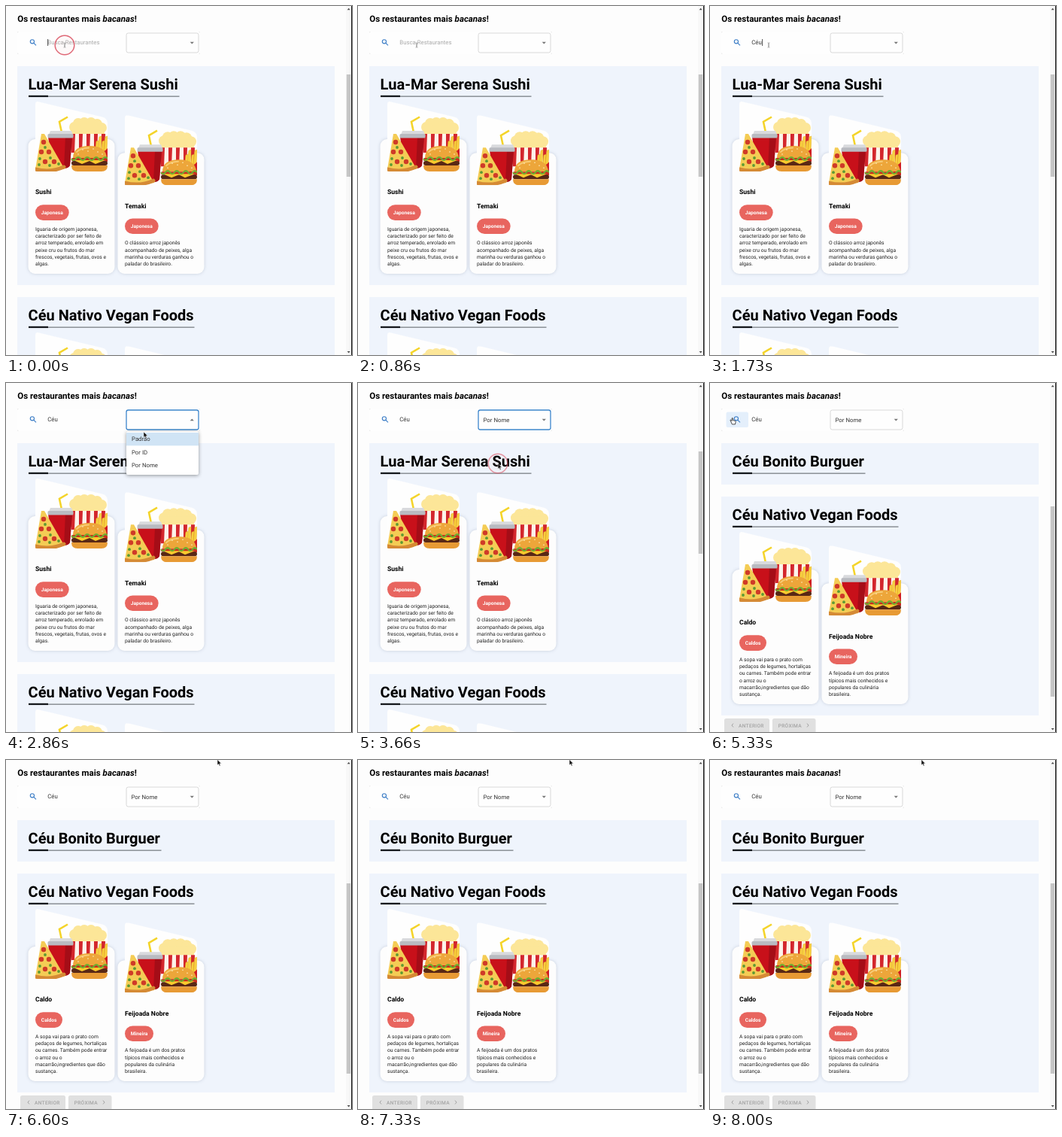
Recreate the animation shown at these times as an HTML page. Size 460 px wide and 464 px high, loop 8060 ms.

```html
<!DOCTYPE html>
<html lang="pt-BR">
<head>
<meta charset="utf-8">
<title>Restaurantes</title>
<style>
  html, body { margin: 0; width: 100%; height: 100%; overflow: hidden; background: #fdfdfd; }
  svg { display: block; }
  text { font-family: Roboto, Arial, sans-serif; text-rendering: geometricPrecision; white-space: pre; }
  .title { font-size: 11.55px; font-weight: 700; }
  .head { font-size: 20px; font-weight: 700; }
  .dish { font-size: 8.6px; font-weight: 700; }
  .tag { font-size: 6.65px; font-weight: 700; fill: #fff; }
  .body { font-size: 6.75px; fill: #222; }
  .field { font-size: 7.8px; fill: #333; }
  .btn { font-size: 6.6px; font-weight: 500; letter-spacing: .3px; fill: #a2a2a2; }
  .card { fill: #fdfdfd; filter: drop-shadow(0 .5px 2px rgba(40, 60, 90, .2)); }
  .form { fill: #fefefe; filter: drop-shadow(0 .8px .6px rgba(0, 0, 0, .3)); }
  .menu { fill: #fff; filter: drop-shadow(0 1.5px 2.5px rgba(0, 0, 0, .4)); }
</style>
</head>
<body>
<svg id="stage" width="460" height="464" viewBox="0 0 460 464"></svg>
<script>
const LOOP = 8060, STEP = 200 / 3;

const rect = (x, y, w, h, fill, more = '') =>
  `<rect x="${x}" y="${y}" width="${w}" height="${h}" fill="${fill}" ${more}/>`;
const text = (x, y, cls, str, more = '') =>
  `<text x="${x}" y="${y}" class="${cls}" ${more}>${str}</text>`;
const dots = (list, r, fill) =>
  list.map(([x, y]) => `<circle cx="${x}" cy="${y}" r="${r}" fill="${fill}"/>`).join('');
const range = n => [...Array(n).keys()];

// Meal illustration, 96 x 93, cut by a slanted top edge
const meal = `
<clipPath id="slant"><path d="M0 93V4Q0-1 5 .4L89 20.5Q96 22.5 96 29V93Z"/></clipPath>
<g id="meal" clip-path="url(#slant)">
  ${rect(0, -2, 96, 95, '#fefefe')}
  ${dots([[52, 34], [57, 29], [65, 28], [74, 28], [82, 30], [88, 35]], 7, '#fce698')}
  ${rect(47, 32, 45, 12, '#fce698')}
  <path d="M46 43H95L91 68H50Z" fill="#fdf3ea"/>
  ${range(5).map(i => `<path d="M${48 + i * 10} 43h5l-1 25h-4z" fill="#d3262c"/>`).join('')}
  ${range(4).map(i => `<path d="M${81 + i * 4} ${53 - i % 2 * 6}l3-1 -1 20h-4z" fill="#f8d040" stroke="#e3aa24" stroke-width=".5"/>`).join('')}
  <path d="M86 66Q91 68 96 62V80H86Z" fill="#cf1d22"/>
  <path d="M17 47H49L46 85Q44 89 34 89T22 85Z" fill="#c8101a"/>
  <path d="M40 47H49L46 85Q44 89 38 89Z" fill="#a50d17"/>
  <path d="M35 41L32 27L43 20.5" fill="none" stroke="#f4d42a" stroke-width="2.6"/>
  <path d="M20 39H48L50 44H18Z" fill="#d9dadd"/>
  ${rect(16.5, 43, 34, 5.5, '#b9bbc1', 'rx="1.5"')}
  <path d="M8 43L0 90H39L12 43Z" fill="#f4cc55"/>
  <path d="M0 90Q20 95 38 87" fill="none" stroke="#d58a35" stroke-width="5" stroke-linecap="round"/>
  ${dots([[11, 54], [8, 67], [18, 67], [13, 80], [25, 80]], 3.2, '#cf3a28')}
  ${dots([[13, 61], [6, 76], [20, 75], [5, 84], [31, 83], [19, 85]], 1.9, '#5c9a33')}
  <path d="M50 75Q50 59 72 59T95 75Z" fill="#eda63a"/>
  <path d="M55 67Q60 62 71 61.5" fill="none" stroke="#f8cb74" stroke-width="2" stroke-linecap="round"/>
  ${dots([[63, 64], [70, 66], [77, 63], [83, 67], [89, 70], [57, 70]], .8, '#fff0c0')}
  ${rect(48, 75, 48, 4, '#c92b20', 'rx="1.5"')}
  ${rect(48, 79, 48, 6, '#592815', 'rx="3"')}
  <path d="M51 78H93L80 83L72 79L62 83Z" fill="#f9c92d"/>
  <path d="M48 76${'q3 4 6 0t6 0'.repeat(4)}" fill="none" stroke="#6fae30" stroke-width="2.2"/>
  <path d="M48 85H96Q96 93 88 93H56Q48 93 48 85Z" fill="#e79a34"/>
</g>`;

function card(x, y, { name, tag, tagW, lines }) {
  return rect(x, y, 115, 356 - y, '#fdfdfd', 'class="card" rx="9"') +
    `<use href="#meal" x="${x + 9.5}" y="${y - 50}"/>` +
    text(x + 9.5, y + 73.3, 'dish', name) +
    rect(x + 9.5, y + 87.2, tagW, 20.7, '#e8655f', 'rx="10.3"') +
    text(x + 17.3, y + 99.9, 'tag', tag) +
    lines.map((l, i) => text(x + 9.5, y + 122.2 + i * 9.13, 'body', l)).join('');
}

// Sections are laid out as if their top were at y = 80
function section(y, h, title, lineW, cards = []) {
  return `<g transform="translate(0 ${y - 80})">` +
    rect(15, 80, 422, h, '#eff4fc') +
    text(29.6, 110.9, 'head', title) +
    rect(30, 119.7, lineW, .8, '#33383d') +
    rect(30, 118.8, 26, 2.3, '#15191d') +
    cards.map((c, i) => card(29.5 + i * 119, 177 + i * 18.2, c)).join('') + '</g>';
}

const sushi = { name: 'Sushi', tag: 'Japonesa', tagW: 44.7, lines: [
  'Iguaria de origem japonesa,', 'caracterizado por ser feito de', 'arroz temperado, enrolado em',
  'peixe cru ou frutos do mar', 'frescos, vegetais, frutas, ovos e', 'algas.'] };
const temaki = { name: 'Temaki', tag: 'Japonesa', tagW: 44.7, lines: [
  'O clássico arroz japonês', 'acompanhado de peixes, alga', 'marinha ou verduras ganhou o', 'paladar do brasileiro.'] };
const caldo = { name: 'Caldo', tag: 'Caldos', tagW: 36, lines: [
  'A sopa vai para o prato com', 'pedaços de legumes, hortaliças', 'ou carnes. Também pode entrar',
  'o arroz ou o', 'macarrão,ingredientes que dão', 'sustança.'] };
const feijoada = { name: 'Feijoada Nobre', tag: 'Mineira', tagW: 38, lines: [
  'A feijoada é um dos pratos', 'típicos mais conhecidos e', 'populares da culinária', 'brasileira.'] };

const vegan = y => section(y, 291, 'Céu Nativo Vegan Foods', 220.5, [caldo, feijoada]);
const chevron = (x, d) =>
  `<path d="M${x + d} 452.7l${-2 * d} 2.4 ${2 * d} 2.4" fill="none" stroke="#a2a2a2" stroke-width="1"/>`;
const options = ['Padrão', 'Por ID', 'Por Nome'];

document.getElementById('stage').innerHTML = `
<defs>${meal}</defs>
${rect(0, 0, 460, 464, '#fdfdfd')}
<text x="15.2" y="21" class="title">Os restaurantes mais <tspan font-style="italic">bacanas</tspan>!</text>
<g id="before">${section(80, 291, 'Lua-Mar Serena Sushi', 200.5, [sushi, temaki])}${vegan(387)}</g>
<g id="after">
  ${section(80, 55, 'Céu Bonito Burguer', 176.5)}${vegan(151)}
  ${rect(19, 446, 60, 20, '#e0e0e0', 'rx="2.5"')}${rect(83, 446, 57.5, 20, '#e0e0e0', 'rx="2.5"')}
  ${chevron(30, 1)}${text(38, 457.5, 'btn', 'ANTERIOR')}
  ${text(90.7, 457.5, 'btn', 'PRÓXIMA')}${chevron(130, -1)}
</g>
${rect(15, 34, 243, 30, '#fefefe', 'class="form" rx="2"')}
${rect(21.5, 38.5, 29.5, 20.5, '#e4effb', 'id="hover" rx="2.5"')}
<g fill="none" stroke="#3a7cc6" stroke-width="1.1"><circle cx="34.9" cy="47.3" r="2.6"/><path d="M36.8 49.2L40 52.4"/></g>
${text(55.3, 51.3, 'field', '', 'id="query"')}
${rect(55.3, 44, .8, 9, '#222', 'id="caret"')}
${rect(160, 36, 96, 26, 'none', 'id="select" rx="2.5"')}
<path id="arrow" d="M-2.6-1.2H2.6L0 1.4Z" fill="#757575"/>
${text(166.5, 51.6, 'field', 'Por Nome', 'id="choice"')}
<g id="bar">
  ${rect(452, 0, 7, 464, '#f8f8f8')}${rect(452.7, 91, 5.6, 136, '#c6c6c6', 'id="thumb"')}
  <path d="M453.6 5.2h4l-2-2.4zM453.6 459h4l-2 2.4z" fill="#505050"/>
</g>
${rect(459, 0, 1, 464, '#111')}
<g id="menu">
  ${rect(160, 64.5, 96, 57.5, '#fff', 'class="menu" rx="2"')}
  ${rect(160, 66, 96, 17.3, '#d0e4f5')}${rect(160, 0, 96, 17.3, '#f0f0f0', 'id="row"')}
  ${options.map((o, i) => text(167, 77.3 + i * 17.3, 'field', o)).join('')}
</g>
<circle id="ring" r="12.8" fill="#e0566a" fill-opacity=".03" stroke="#dc5868" stroke-width="1.5"/>
<g id="pointer">
  <path id="beam" d="M-1.4-3.2Q0-3.2 0-2.5V2.5Q0 3.2-1.4 3.2M1.4-3.2Q0-3.2 0-2.5V2.5Q0 3.2 1.4 3.2" fill="none" stroke="#888" stroke-width=".7"/>
  <path id="tip" d="M0 0V7.3L1.7 5.8 2.9 8.4 4.1 7.9 3 5.3H5.3Z" fill="#111" stroke="#fff" stroke-width=".5"/>
  <path id="hand" d="M-1-3.6Q-.2-4.4.5-3.6V-.8L3.4-.2Q4.2 0 4.1 1L3.5 4.4H-.6L-3-.9Q-2.9-1.9-2-1.4L-1 0Z" fill="#fff" stroke="#222" stroke-width=".8"/>
</g>`;

const $ = id => document.getElementById(id);
const show = (id, on) => $(id).setAttribute('visibility', on ? 'visible' : 'hidden');
const set = (id, attrs) => { for (const k in attrs) $(id).setAttribute(k, attrs[k]); };

// time, x, y
const path = [
  [0, 78, 52], [1800, 78, 52], [2260, 203, 50], [2460, 203, 50], [2860, 183, 65], [3060, 183, 72],
  [3460, 186, 107], [3700, 186, 107], [4400, 41, 56], [4540, 41, 56], [4800, 30, 50.5],
  [5660, 30, 50.5], [6060, 205, 28], [6330, 281, -.5], [LOOP, 281, -.5]
];
const clicks = [[0, 78, 52], [2330, 203, 50], [3540, 186, 107], [4860, 30, 50.5]];
const keys = [[930, 'C'], [1130, 'Cé'], [1400, 'Céu']];

const ease = u => u * u * (3 - 2 * u);
function locate(t) {
  const i = path.findIndex(p => p[0] > t);
  const [a, b] = [path[i - 1], path[i]];
  const u = ease((t - a[0]) / (b[0] - a[0]));
  return [a[1] + (b[1] - a[1]) * u, a[2] + (b[2] - a[2]) * u];
}
const inside = (x, y, l, t, r, b) => x >= l && x <= r && y >= t && y <= b;

function draw(time) {
  const t = Math.floor((time + 7) / STEP) * STEP % LOOP;
  const [x, y] = locate(t);
  const open = t >= 2400 && t < 3660;
  const found = t >= 5060;
  const chosen = t >= 3600;
  const focus = t >= 2330 && t < 4860;
  const overButton = t > 4000 && inside(x, y, 21, 38, 52, 60);

  show('before', !found);
  show('after', found);
  show('bar', !open);
  set('thumb', found ? { y: 164, height: 253 } : { y: 91, height: 136 });

  const key = keys.filter(k => k[0] <= t + 1).pop();
  const query = $('query');
  query.textContent = key ? key[1] : 'Busca Restaurantes';
  query.style.fill = key ? '#333' : '#a9a9a9';
  const typedAt = key ? key[0] : 0;
  show('caret', t < 2330 && (t - typedAt) % 1000 < 500);
  set('caret', { x: key ? 55.8 + query.getComputedTextLength() : 55.3 });

  set('select', focus ? { stroke: '#3d86cc', 'stroke-width': 1.3 } : { stroke: '#cecece', 'stroke-width': .8 });
  set('arrow', { transform: `translate(247.3 49) scale(1 ${open ? -1 : 1})` });
  show('choice', chosen);
  show('menu', open);
  const row = Math.floor((y - 66) / 17.3);
  show('row', open && (row === 1 || row === 2));
  set('row', { y: 66 + row * 17.3 });
  show('hover', overButton);
  set('hover', { opacity: t < 4860 ? .4 : 1 });

  const click = clicks.find(c => t >= c[0] && t < c[0] + 400);
  show('ring', click);
  if (click) set('ring', { cx: click[1], cy: click[2], opacity: .9 * (1 - (t - click[0]) / 400) });

  const overField = !open && inside(x, y, 54, 36, 155, 62) && (t < 2400 || t > 3800);
  const overSelect = !open && inside(x, y, 160, 36, 256, 62);
  const hand = overButton || overSelect;
  show('beam', overField);
  show('hand', hand);
  show('tip', !overField && !hand);
  set('pointer', { transform: `translate(${x} ${y})` });
}

const start = performance.now();
function tick() {
  draw((performance.now() - start) % LOOP);
  requestAnimationFrame(tick);
}
tick();
</script>
</body>
</html>
```
